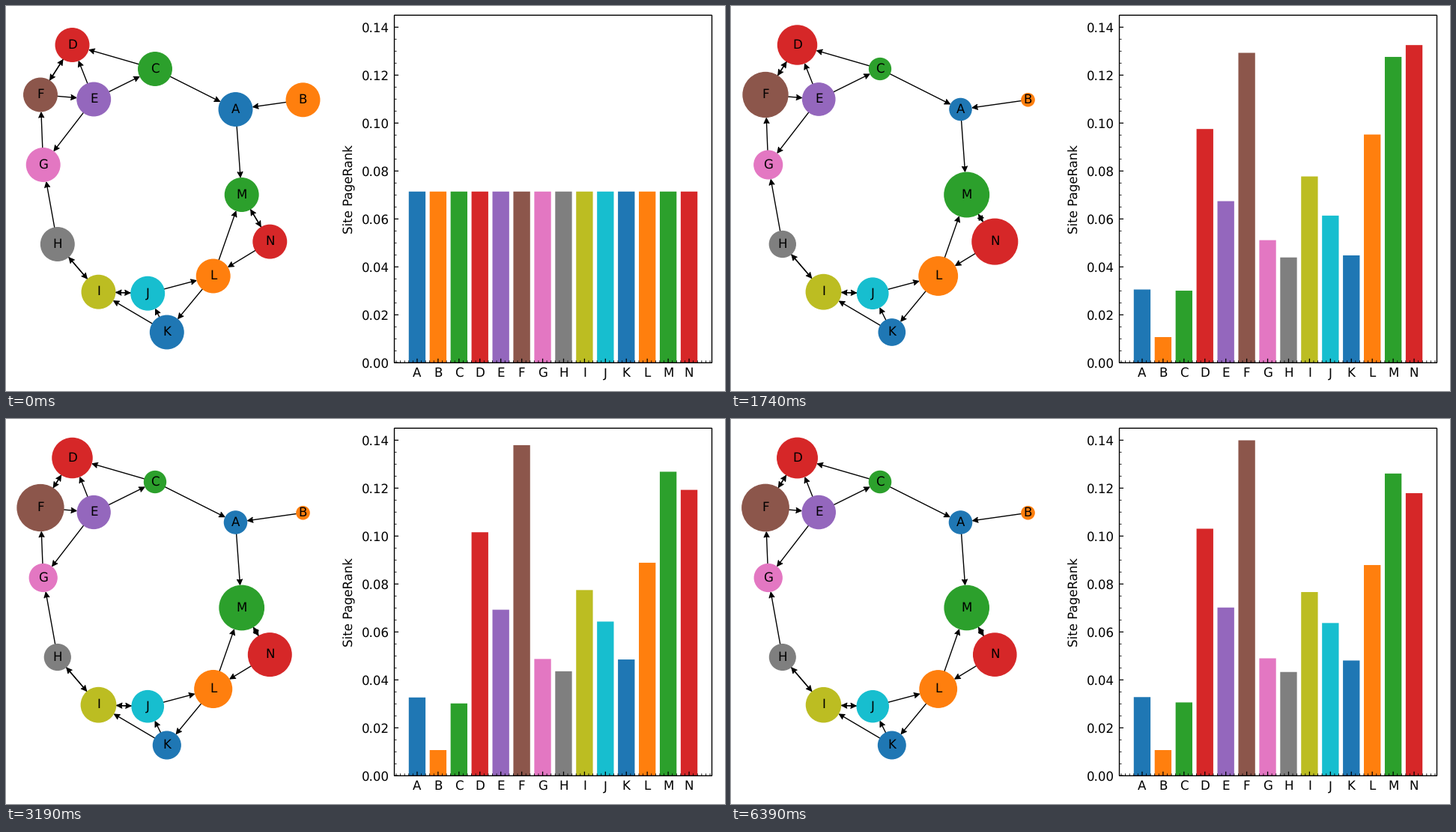
Write a matplotlib script that moves like this. It is 960 px wide and 514 px high and loops after 6.68 s.

```python
import numpy as np
import matplotlib.pyplot as plt
from matplotlib.animation import FuncAnimation
from matplotlib.collections import LineCollection, PolyCollection
from matplotlib.patches import Rectangle

plt.rcParams["text.hinting"] = "none"

W, H, DPI = 960, 514, 100
PT = DPI / 72                       # pixels per point
INTERVAL, LOOP = 20, 6680           # ms
START, STEP, SUBSTEPS, ROUNDS = 890, 50, 5, 22
DAMPING = 0.85
NODE_AREA = 14400                   # square points for a rank of 1
ARROW_SIZE = 12

NAMES = "ABCDEFGHIJKLMN"
N = len(NAMES)
POS = np.array([
    (306.5, 138), (396.5, 125.3), (199, 84), (88.5, 52), (117.2, 124.5),
    (46, 118.5), (49.7, 212), (68.8, 318), (123.5, 381.7), (189.2, 383.7),
    (214.8, 435.5), (276.7, 360.5), (314.7, 252), (352.3, 314.6)])
LINKS = ("AM BA CA CD DF EC ED EG FD FE GF HG HI IH IJ "
         "JI JL KI KJ LK LM MN NM NL").split()
SRC = np.array([NAMES.index(a) for a, _ in LINKS])
DST = np.array([NAMES.index(b) for _, b in LINKS])
COLORS = [f"C{i % 10}" for i in range(N)]

# Bar chart frame in pixels
LEFT, RIGHT, TOP, BOTTOM = 518.5, 942.5, 12.3, 476.3
Y_MAX = 0.145
X_MIN, X_MAX = -1.09, 14.09


def rank_history():
    out = np.bincount(SRC, minlength=N)
    ranks = [np.full(N, 1 / N)]
    for _ in range(ROUNDS):
        r = ranks[-1]
        flow = np.bincount(DST, weights=(r / out)[SRC], minlength=N)
        ranks.append((1 - DAMPING) / N + DAMPING * flow)
    return np.array(ranks)


HISTORY = rank_history()


def ranks_at(ms):
    """Linear blend between successive rounds, in discrete steps."""
    step = np.clip((ms - START) // STEP, 0, ROUNDS * SUBSTEPS)
    i, part = divmod(int(step), SUBSTEPS)
    j = min(i + 1, ROUNDS)
    return HISTORY[i] + (HISTORY[j] - HISTORY[i]) * part / SUBSTEPS


def bar_x(v):
    return LEFT + (v - X_MIN) / (X_MAX - X_MIN) * (RIGHT - LEFT)


def bar_y(v):
    return BOTTOM - v / Y_MAX * (BOTTOM - TOP)


def arrows(sizes):
    """Shafts and triangular heads running between the node edges."""
    head_len, head_half = 0.4 * ARROW_SIZE * PT, 0.2 * ARROW_SIZE * PT
    pad = 0.5 * PT * np.hypot(head_len, head_half) / head_half
    radius = np.sqrt(sizes) / 2 * PT
    d = POS[DST] - POS[SRC]
    u = d / np.linalg.norm(d, axis=1)[:, None]
    side = np.column_stack([-u[:, 1], u[:, 0]]) * head_half
    tail = POS[SRC] + u * radius[SRC][:, None]
    tip = POS[DST] - u * (radius[DST] + pad)[:, None]
    back = tip - u * head_len
    return (np.stack([tail, tip], axis=1),
            np.stack([back + side, tip, back - side], axis=1))


def bar_shapes(ranks):
    x = bar_x(np.arange(N))
    half = 0.4 * (bar_x(1) - bar_x(0))
    y = np.maximum(bar_y(ranks), TOP)
    base = np.full(N, BOTTOM)
    xs = np.stack([x - half, x - half, x + half, x + half], axis=1)
    ys = np.stack([base, y, y, base], axis=1)
    return np.stack([xs, ys], axis=2)


fig = plt.figure(figsize=(W / DPI, H / DPI), dpi=DPI, facecolor="white")
ax = fig.add_axes([0, 0, 1, 1])
ax.set_xlim(0, W)
ax.set_ylim(H, 0)
ax.axis("off")

# Graph
round_ends = dict(linewidths=1, capstyle="round", joinstyle="round")
shafts = LineCollection([], colors="black", zorder=1, **round_ends)
heads = PolyCollection([], facecolors="black", edgecolors="black",
                       zorder=1.1, **round_ends)
bars = PolyCollection([], facecolors=COLORS, edgecolors="none",
                      linewidths=0, zorder=1, snap=False)
for c in (shafts, heads, bars):
    ax.add_collection(c, autolim=False)
nodes = ax.scatter(*POS.T, s=NODE_AREA / N, c=COLORS, linewidths=1,
                   zorder=2, snap=False)
for name, (x, y) in zip(NAMES, POS):
    ax.text(x, y, name, fontsize=12, ha="center", va="center", zorder=4)


# Chart frame, ticks and labels
def add_ticks(xs, ys, length, width):
    lines = [[(x, BOTTOM), (x, BOTTOM - length)] for x in xs]
    lines += [[(LEFT, y), (LEFT + length, y)] for y in ys]
    ax.add_collection(LineCollection(lines, colors="black", linewidths=width,
                                     capstyle="butt", zorder=3, snap=False),
                      autolim=False)


major_y = np.arange(8) * 0.02
add_ticks(bar_x(np.arange(N)), bar_y(major_y), 4 * PT, 0.9)
minor_x = [k / 5 for k in range(-5, 71) if k % 5 or not 0 <= k < 5 * N]
minor_y = [k * 0.005 for k in range(29) if k % 4]
add_ticks(bar_x(np.array(minor_x)), bar_y(np.array(minor_y)), 2.2 * PT, 0.6)
ax.add_patch(Rectangle((LEFT, TOP), RIGHT - LEFT, BOTTOM - TOP, fill=False,
                       edgecolor="black", linewidth=1, zorder=3.5,
                       snap=False))
for i, name in enumerate(NAMES):
    ax.text(bar_x(i), BOTTOM + 6, name, fontsize=12, ha="center", va="top")
for v in major_y:
    ax.text(LEFT - 6.4, bar_y(v), f"{v:.2f}", fontsize=12,
            ha="right", va="center_baseline")
ax.text(459, (TOP + BOTTOM) / 2, "Site PageRank", fontsize=12, rotation=90,
        ha="center", va="center")


def update(frame):
    ranks = ranks_at(frame * INTERVAL + INTERVAL // 2)
    sizes = NODE_AREA * ranks
    lines, tips = arrows(sizes)
    shafts.set_segments(lines)
    heads.set_verts(tips, closed=False)
    nodes.set_sizes(sizes, DPI)
    bars.set_verts(bar_shapes(ranks))
    return shafts, heads, nodes, bars


anim = FuncAnimation(fig, update, frames=LOOP // INTERVAL, interval=INTERVAL,
                     repeat=True, repeat_delay=0, blit=False)
plt.show()
```
